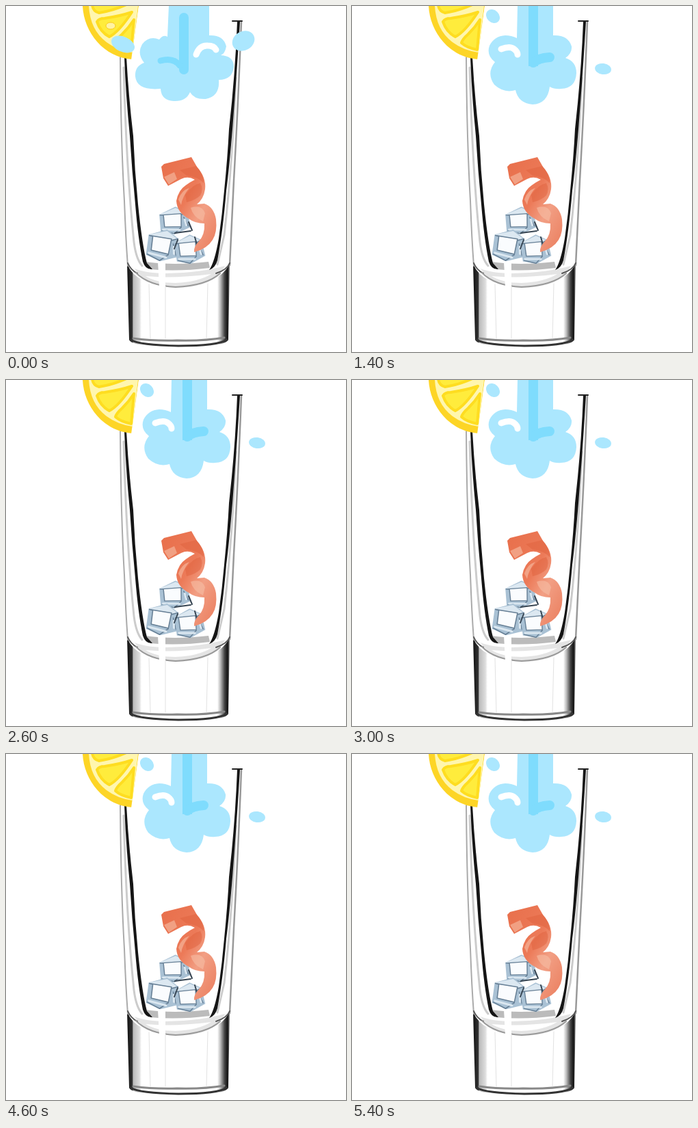
Animation, 497 px wide and 506 px high, one loop 5610 ms. Source, as an HTML page:

```html
<!DOCTYPE html>
<html lang="en">
<head>
<meta charset="utf-8">
<title>Drink being poured</title>
<style>
html, body { margin: 0; width: 100%; height: 100%; overflow: hidden; background: #fff; }
svg { display: block; width: 497px; height: 506px; }
.line { fill: none; stroke-linecap: round; stroke-linejoin: round; }
.water { fill: #abe7fe; }
.deep { stroke: #7fdcfd; stroke-width: 14; }
.shine { stroke: #fff; stroke-width: 9; }
</style>
</head>
<body>
<svg viewBox="0 0 497 506">
  <defs>
    <linearGradient id="peel" x1="0" y1="0" x2="1" y2="1">
      <stop offset="0" stop-color="#e86f4b"/>
      <stop offset=".45" stop-color="#ec7a58"/>
      <stop offset=".65" stop-color="#f29f84"/>
      <stop offset="1" stop-color="#ea7c5c"/>
    </linearGradient>
    <linearGradient id="base">
      <stop offset="0" stop-color="#111"/>
      <stop offset=".05" stop-color="#333"/>
      <stop offset=".06" stop-color="#bbb"/>
      <stop offset=".12" stop-color="#ddd"/>
      <stop offset=".14" stop-color="#fff"/>
      <stop offset=".88" stop-color="#fff"/>
      <stop offset=".91" stop-color="#bbb"/>
      <stop offset=".95" stop-color="#444"/>
      <stop offset=".98" stop-color="#111"/>
      <stop offset="1" stop-color="#888"/>
    </linearGradient>
    <clipPath id="wedge"><path d="M112 0C114 39 143 75 184 78L194 0Z"/></clipPath>
    <g id="cube">
      <path fill="#a9c1d4" d="M-20-14L6-23L23-11L24 15L-1 23L-22 15Z"/>
      <path fill="#dce8f1" d="M-20-14L6-21L21-11L10-8Z"/>
      <path fill="#fafcfe" d="M-14-12L13-10L10 12L-15 8Z"/>
      <path class="line" stroke="#667f95" stroke-width="1.5" d="M-19-13L-14-12L-15 8L10 12L13-10ZM14-8L22-11M-20 14L-2 22L10 13M16-3L21 13"/>
      <path class="line" stroke="#dbe7f0" stroke-width="3" d="M-18 12L7 17M17 1L18 11"/>
    </g>
  </defs>

  <g id="glass">
    <path fill="url(#base)" d="M177 377L180 488Q184 499 252 499Q320 499 325 488L327 377Q310 410 250 411Q190 410 177 377Z"/>
    <path fill="#e4e4e4" d="M188 384Q205 391 235 391Q285 390 320 380Q306 411 250 412Q205 411 188 384Z"/>
    <path fill="#fff" d="M204 395Q245 399 300 392Q280 404 248 405Q220 405 204 395Z"/>
    <path fill="#bbb" d="M203 374Q245 380 296 374L298 383Q250 389 211 385Z"/>
    <g class="line">
      <path stroke="#aaa" stroke-width="2" d="M167 75Q168 200 173 285Q175 340 178 380"/>
      <path stroke="#ccc" stroke-width="3" d="M172 90Q176 240 187 345Q190 370 199 380M336 105Q331 230 319 335L309 378"/>
      <path stroke="#999" stroke-width="2.5" d="M344 23Q339 150 333 255L327 379"/>
      <path stroke="#222" stroke-width="2" d="M331 22H345"/>
      <path stroke="#555" stroke-width="2" d="M178 376Q182 386 192 391M307 391Q323 386 327 376"/>
      <path stroke="#999" stroke-width="2" d="M190 390Q208 409 248 411Q293 409 313 391"/>
      <path stroke="#333" stroke-width="3" d="M182 488Q195 496 252 497Q310 497 323 488"/>
      <path stroke="#888" stroke-width="3" d="M186 486Q215 490 250 489Q290 490 319 485"/>
      <path stroke="#e2e2e2" d="M209 407L211 486M295 406L293 486M233 410V486"/>
    </g>
    <path fill="#151515" d="M173 75H176Q179 130 186 190Q188 240 193 290Q199 350 206 376L214 385Q204 386 200 374Q193 340 189 290Q184 240 181 190Q175 130 173 75Z"/>
    <path fill="#151515" d="M338 23H342Q338 90 331 180Q326 240 322 270Q317 330 309 372Q306 383 297 386Q305 375 311 340Q316 305 319 270Q324 220 326 180Q335 100 338 23Z"/>
    <path fill="#fff" d="M222 374H233V411H224Z"/>
  </g>

  <g id="ice">
    <use href="#cube" transform="translate(245 314) rotate(-9) scale(.96 .86)"/>
    <use href="#cube" transform="translate(228 350) rotate(4) scale(1.02)"/>
    <use href="#cube" transform="translate(267 356) rotate(-11) scale(.92)"/>
    <path class="line" stroke="#384653" stroke-width="2" d="M247 332L270 329M251 342L246 355M267 316L272 328M276 338L280 352"/>
  </g>

  <g id="twist">
    <path fill="url(#peel)" d="M227 235L231 231L271 221L279 235Q293 251 291 268Q289 282 279 290L290 289Q304 294 307 312Q309 331 302 342Q294 355 275 360Q274 352 282 344Q291 334 290 318Q276 318 267 311Q250 302 249 285Q252 269 263 262Q270 257 276 254Q266 248 256 253L237 263L230 252Z"/>
    <path fill="#e0633f" d="M254 240L278 234Q290 247 289 259Q281 250 264 248ZM262 276Q273 261 284 259Q289 268 284 277Q277 284 264 287Z" opacity=".5"/>
    <path fill="#f7bfa6" d="M270 295Q286 290 291 303L288 315Q273 308 270 295ZM252 283Q256 270 268 266Q258 278 256 291ZM231 250L246 243L250 253L238 261Z" opacity=".6"/>
  </g>

  <g id="lemon" clip-path="url(#wedge)">
    <path fill="#fdd526" d="M110 0H194L183 79Q115 75 110 0Z"/>
    <path fill="#fff6ae" d="M121 0Q123 35 147 53Q163 65 185 68L193 0Z"/>
    <g fill="#ffec3c" stroke="#fedd20" stroke-width="4" stroke-linejoin="round">
      <path d="M126-2H176Q156 7 136 10Q127 8 126-2Z"/>
      <path d="M184 9Q165 38 151 45Q138 38 133 23Q136 18 144 18Q166 15 184 9Z"/>
      <path d="M187 20L183 64Q168 61 160 54Q161 49 170 41Q180 31 187 20Z"/>
    </g>
    <ellipse id="pip" cx="153" cy="29" rx="7" ry="5" fill="#fff3a3" stroke="#f9c91c"/>
  </g>

  <g class="pose">
    <path class="water" d="M238-1H297V43Q318 42 322 59Q320 70 314 72Q333 73 333 89Q331 108 311 108Q313 132 292 136Q275 137 269 126Q263 140 245 139Q227 138 226 121Q191 124 189 103Q188 88 202 83Q191 70 199 56Q209 43 224 49Q230 41 236 45Z"/>
    <path class="line deep" d="M260 17V93"/>
    <path class="line deep" style="stroke-width:9" d="M226 80Q245 75 254 87"/>
    <path class="line shine" d="M278 71Q283 57 295 58Q304 58 307 64"/>
    <ellipse class="water" cx="171" cy="56" rx="18" ry="11" transform="rotate(24 171 56)"/>
    <ellipse class="water" cx="347" cy="51" rx="17" ry="14" transform="rotate(-30 347 51)"/>
  </g>
  <g class="pose">
    <path class="water" d="M242-1H294V43Q316 42 321 59Q322 69 312 76Q328 81 328 98Q327 120 306 121Q296 122 289 118Q286 143 264 144Q243 142 239 123Q222 128 208 115Q196 98 209 82Q196 72 201 58Q208 44 224 43Q233 43 241 47Z"/>
    <path class="line deep" style="stroke-linecap:butt" d="M265-1V88"/>
    <path class="line deep" d="M265 83Q272 76 289 75"/>
    <path class="line shine" d="M218 63Q231 58 237 63Q242 67 242 71"/>
    <ellipse class="water" cx="206" cy="15" rx="11" ry="9" transform="rotate(45 206 15)"/>
    <ellipse class="water" cx="367" cy="92" rx="12" ry="8" transform="rotate(8 367 92)"/>
  </g>
</svg>
<script>
const LOOP = 5610, STEP = 200, LAST = 27;
const poses = document.querySelectorAll('.pose');
const pip = document.getElementById('pip');
const show = (el, on) => el.style.display = on ? '' : 'none';
const start = performance.now();

function draw() {
  const time = (performance.now() - start) % LOOP;
  const active = Math.min(LAST, Math.floor(time / STEP)) % 2;
  poses.forEach((pose, i) => show(pose, i === active));
  show(pip, active === 0);
  requestAnimationFrame(draw);
}
draw();
</script>
</body>
</html>
```
